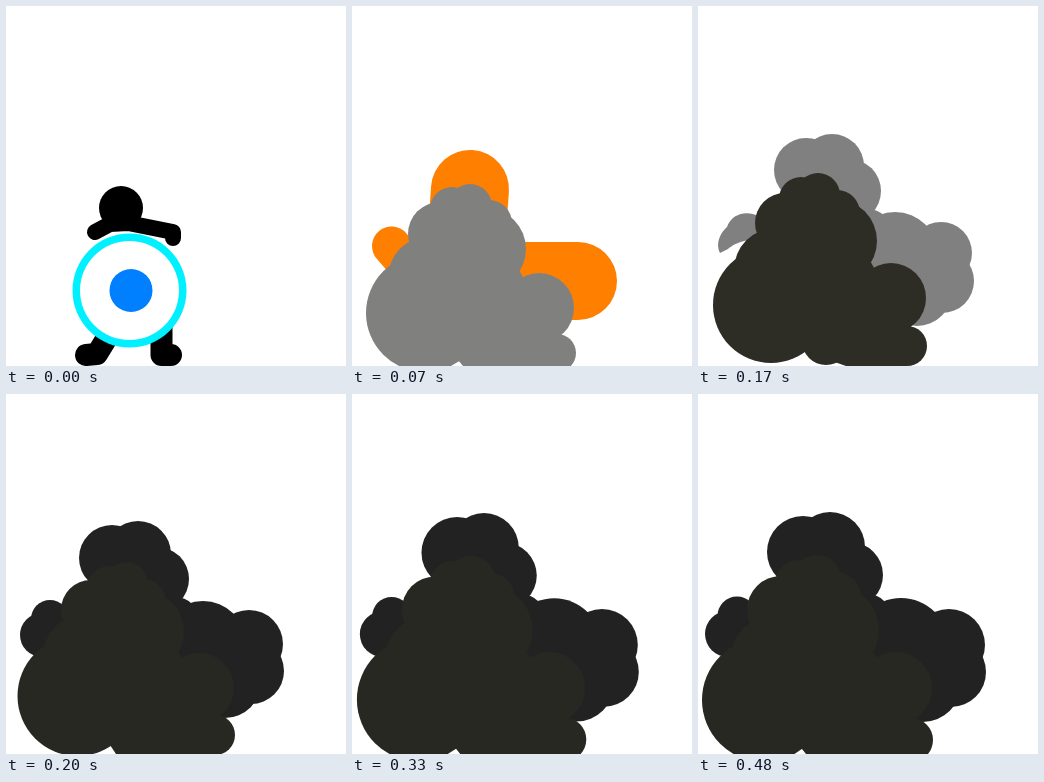
Animation, 340 px wide and 360 px high, one loop 540 ms. Source, as an HTML page with a canvas:

```html
<!DOCTYPE html>
<html lang="en">
<head>
<meta charset="utf-8">
<title>Blast</title>
<style>
html, body { margin: 0; width: 100%; height: 100%; overflow: hidden; background: #fff; }
canvas { display: block; }
</style>
</head>
<body>
<canvas id="stage" width="340" height="360"></canvas>
<script>
const ctx = document.getElementById('stage').getContext('2d');
const LOOP = 540;

function disc(x, y, r, color) {
  ctx.fillStyle = color;
  ctx.beginPath();
  ctx.arc(x, y, r, 0, Math.PI * 2);
  ctx.fill();
}

function limb(width, color, ...pts) {
  ctx.strokeStyle = color;
  ctx.lineWidth = width;
  ctx.lineCap = ctx.lineJoin = 'round';
  ctx.beginPath();
  pts.forEach(p => ctx.lineTo(...p));
  ctx.stroke();
}

function poly(color, pts) {
  ctx.fillStyle = color;
  ctx.beginPath();
  pts.forEach(p => ctx.lineTo(p[0], p[1]));
  ctx.fill();
}

// Puffs are [x, y, radius].
const puffs = (list, color) => list.forEach(p => disc(...p, color));

const mix = (a, b, k) => a.map((p, i) => p.map((v, j) => v + (b[i][j] - v) * k));

// Front cloud order: base, side, shoulder, torso, three crown puffs, lobe, tail.
function cloud(list, color, notch, floorX) {
  const [base, , shoulder, torso, , , , lobe, tail] = list;
  const waist = [(torso[0] + lobe[0]) / 2 + 8, (torso[1] + lobe[1]) / 2 - 7];
  poly(color, [base, shoulder, torso, waist, lobe, tail, [tail[0], 360], [floorX, 360], notch]);
  puffs(list, color);
}

const fireSmoke = [
  [73, 307, 59], [78, 272, 42], [88, 228, 32], [133, 243, 41],
  [100, 203, 22], [118, 200, 22], [137, 217, 23], [187, 302, 35], [205, 347, 19]
];
const darkSmoke = [
  [73, 299, 58], [78, 264, 42], [87, 217, 30], [137, 235, 42],
  [103, 193, 22], [120, 189, 22], [139, 207, 23], [193, 292, 35], [209, 340, 20]
];
const grayBack = [
  [108, 164, 32], [134, 160, 32], [151, 185, 32], [170, 226, 23],
  [197, 249, 43], [243, 247, 31], [244, 275, 32], [219, 285, 35]
];
const frontFrom = [
  [71.5, 302, 60], [78, 262, 41], [85, 216, 30], [136, 238, 42],
  [103, 194, 22], [120, 190, 22], [137, 208, 23], [193, 294, 35], [209, 341, 20]
];
const frontTo = [
  [66, 306, 62], [75, 264, 42], [83, 216, 34], [136, 236, 45],
  [101, 190, 24], [119, 185, 24], [138, 203, 25], [198, 294, 36], [213, 346, 22]
];
const backFrom = [
  [106, 164, 33], [132, 160, 33], [151, 185, 32], [170, 225, 22], [197, 250, 43],
  [243, 250, 34], [245, 277, 33], [219, 288, 36], [44, 225, 19], [36, 241, 22]
];
const backTo = [
  [105, 158, 36], [132, 153, 35], [152, 181, 33], [170, 222, 22], [203, 252, 48],
  [251, 251, 36], [253, 278, 35], [225, 290, 38], [39, 222, 19.5], [30, 240, 23]
];

function figure() {
  const ink = '#000';
  disc(115, 202, 22, ink);
  limb(16, ink, [89, 226], [104, 218], [122, 217], [167, 226], [167, 232]);
  limb(22, ink, [107, 322], [91, 348], [80, 349]);
  limb(22, ink, [155.5, 315], [155.5, 349], [165, 349]);
  disc(123.5, 284.5, 57, '#00f0ff');
  disc(123.5, 284.5, 49.5, '#fff');
  disc(125, 284.5, 21.5, '#007fff');
}

function flash() {
  const fire = '#ff8000';
  limb(78, fire, [118, 183], [115, 225]);
  limb(78, fire, [150, 275], [226, 275]);
  limb(39, fire, [39.5, 240], [62, 266]);
  cloud(fireSmoke, '#80807f', [106, 354], 111);
}

function smoke() {
  const gray = '#808080', dark = '#2d2c25';
  puffs(grayBack, gray);
  ctx.fillStyle = gray;
  ctx.beginPath();
  ctx.moveTo(22, 247);
  ctx.bezierCurveTo(17, 237, 23, 226, 29, 221);
  ctx.bezierCurveTo(34, 207, 50, 204, 62, 211);
  ctx.lineTo(62, 232);
  ctx.bezierCurveTo(42, 235, 36, 238, 30, 243);
  ctx.fill();
  cloud(darkSmoke, dark, [108, 346], 148);
  disc(128, 335, 24, dark);
}

function swell(k) {
  puffs(mix(backFrom, backTo, k), '#222222');
  cloud(mix(frontFrom, frontTo, k), '#282822', [106 - 2 * k, 354 + k], 110 - 2 * k);
}

// Each pose holds until the given time.
const poses = [
  [70, figure],
  [130, flash],
  [200, smoke],
  [270, () => swell(0)],
  [330, () => swell(0.38)],
  [400, () => swell(0.88)],
  [LOOP, () => swell(1)]
];

const start = performance.now();

function draw() {
  const t = (performance.now() - start) % LOOP;
  ctx.fillStyle = '#fff';
  ctx.fillRect(0, 0, 340, 360);
  poses.find(([end]) => t < end)[1]();
  requestAnimationFrame(draw);
}
draw();
</script>
</body>
</html>
```
